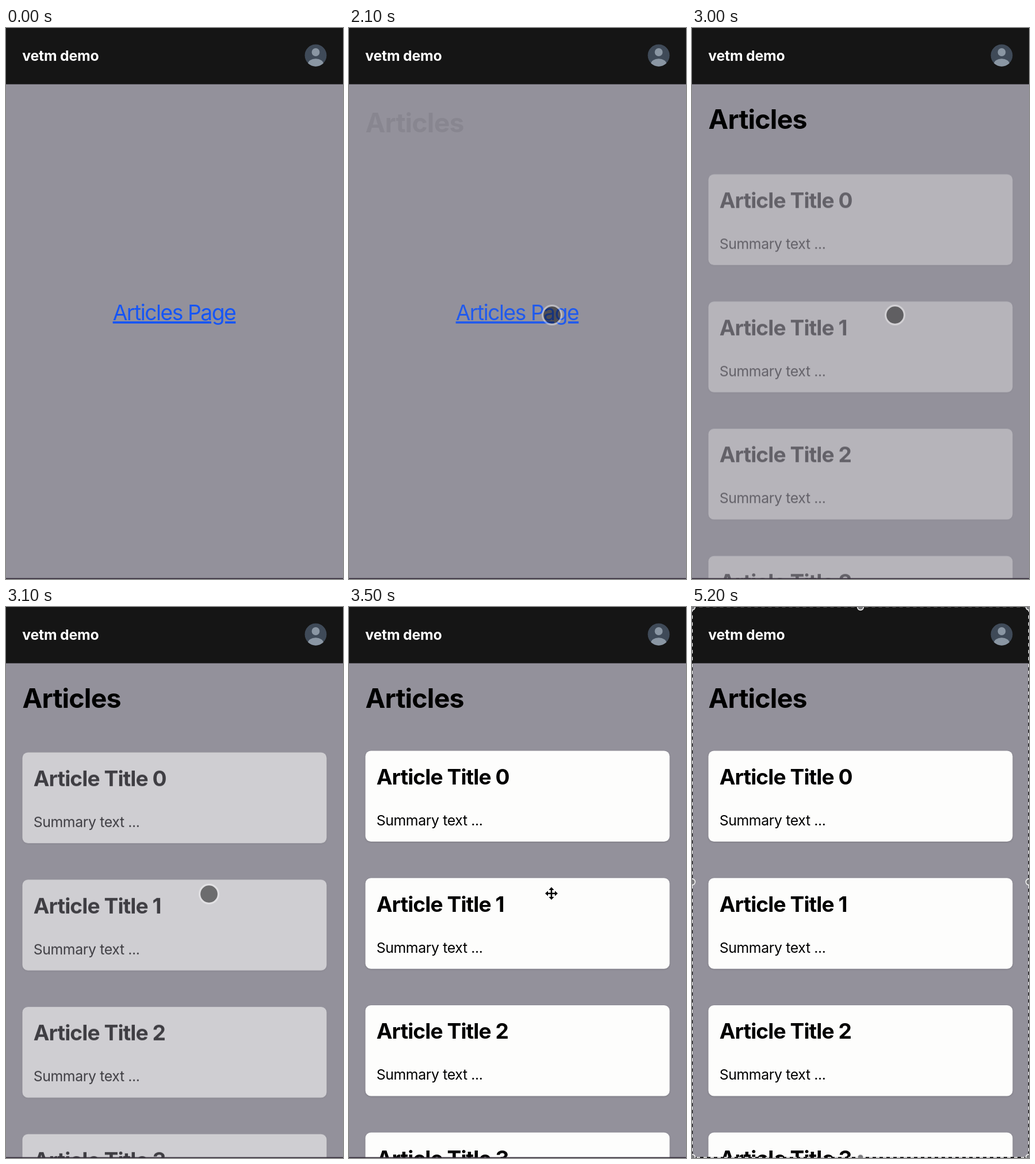
An HTML page for the animation above (5.3 s loop, 586x956 px).

```html
<!DOCTYPE html>
<html lang="en">
<head>
<meta charset="utf-8">
<title>Articles demo</title>
<style>
  html, body { margin: 0; width: 100%; height: 100%; overflow: hidden; background: #93919b; }
  svg { display: block; width: 586px; height: 956px; }
  text { font-family: Inter, "Liberation Sans", sans-serif; font-optical-sizing: none; }
  .brand { font-size: 24.8px; font-weight: 700; letter-spacing: -.008em; fill: #fff; }
  .link { font-size: 37.2px; font-weight: 440; letter-spacing: -.039em; fill: #1555f6; text-anchor: middle;
    text-decoration: underline; text-decoration-thickness: 3px; text-underline-offset: 3px; }
  .heading { font-size: 46.5px; font-weight: 700; letter-spacing: -.018em; }
  .title { font-size: 37.2px; font-weight: 700; letter-spacing: -.025em; }
  .summary { font-size: 24.8px; font-weight: 440; letter-spacing: -.015em; }
  .card { fill: #fdfdfc; filter: drop-shadow(0 1.6px 1.6px rgba(0, 0, 0, .16)); }
</style>
</head>
<body>
<svg viewBox="0 0 586 956">
  <defs><clipPath id="round"><circle cx="538.5" cy="47.5" r="19.2"/></clipPath></defs>
  <rect width="586" height="956" fill="#93919b"/>

  <g id="home"><text class="link" x="292.5" y="507">Articles Page</text></g>
  <g id="heading"><text class="heading" x="28.5" y="175.4">Articles</text></g>
  <g id="cards"></g>

  <rect width="586" height="97.6" fill="#151515"/>
  <text class="brand" x="28.3" y="56.6">vetm demo</text>
  <g clip-path="url(#round)">
    <circle cx="538.5" cy="47.5" r="19.2" fill="#3f4a58"/>
    <g fill="#8a96a3">
      <circle cx="538.5" cy="42" r="6.9"/>
      <ellipse cx="538.5" cy="63" rx="13.7" ry="9.8"/>
    </g>
  </g>
  <rect y="954.5" width="586" height="1.5" fill="#332b38"/>

  <g id="touch">
    <circle r="15" fill="rgba(13,13,13,.51)"/>
    <circle r="16.4" fill="none" stroke="rgba(255,255,255,.38)" stroke-width="3.2"/>
  </g>
  <path id="move" fill="#000" stroke="#fff" stroke-width="1.6" paint-order="stroke" stroke-linejoin="round"/>

  <g id="frame">
    <rect x=".5" y="-.5" width="585" height="955.5" fill="none" stroke="#111" stroke-width="1.6"/>
    <rect id="ants" x=".5" y="-.5" width="585" height="955.5" fill="none" stroke="#fff"
      stroke-width="1.4" stroke-dasharray="6 6"/>
    <g id="grips" fill="#7b7b7e" stroke="#f2f2f2" stroke-width="1.6"></g>
  </g>
</svg>
<script>
const LOOP = 5300, STEP = 100;
const SLIDE = 6.4;
const REST = [353, 498];
const $ = id => document.getElementById(id);

// Article list
$('cards').innerHTML = [0, 1, 2, 3].map(i => `
  <g transform="translate(28.5 ${249.4 + i * 220.75})">
    <rect class="card" width="529" height="157.6" rx="9.6"/>
    <text class="title" x="19.2" y="58.6">Article Title ${i}</text>
    <text class="summary" x="19.2" y="129.4">Summary text ...</text>
  </g>`).join('');

// Four-way arrow, one quarter turned four times
const arm = [[1.3, -1.3], [1.3, -6], [4.6, -6], [0, -11], [-4.6, -6], [-1.3, -6]];
const turn = ([x, y], n) => n ? turn([-y, x], n - 1) : [x, y];
$('move').setAttribute('d', 'M' + [0, 3, 2, 1]
  .map(n => arm.map(p => turn(p, n).join()).join('L')).join('L') + 'Z');

// Selection handles
for (const x of [0, 293, 586])
  for (const y of [0, 477, 955])
    if (x !== 293 || y !== 477)
      $('grips').innerHTML += `<circle cx="${x}" cy="${y}" r="5.4"/>`;

const span = (t, from, to) => Math.min(1, Math.max(0, (t - from) / (to - from)));
const easeOut = u => 1 - (1 - u) ** 2;
const easeInOut = u => u * u * (3 - 2 * u);

function fade(id, amount, slide = 0) {
  $(id).setAttribute('opacity', amount);
  $(id).setAttribute('transform', `translate(0 ${slide * (1 - amount)})`);
}

function place(id, [x, y], on) {
  $(id).setAttribute('transform', `translate(${x} ${y})`);
  $(id).setAttribute('visibility', on ? 'visible' : 'hidden');
}

const glide = (a, b, u) => a.map((v, i) => v + (b[i] - v) * easeInOut(u));

function draw(t) {
  fade('home', 1 - easeOut(span(t, 2080, 2500)));
  fade('heading', easeOut(span(t, 2080, 2680)), SLIDE);
  fade('cards', easeOut(span(t, 2890, 3500)), SLIDE);

  place('touch', glide([400, 985], REST, span(t, 300, 1000)), t >= 300 && t < 3200);
  place('move', glide([352, 497], [330, 985], span(t, 3900, 4600)), t >= 3200 && t < 4600);

  fade('frame', span(t, 3500, 3700));
  $('ants').setAttribute('stroke-dashoffset', -(t - 5200) / 50);
}

function tick() {
  const t = performance.now() % LOOP;
  draw(Math.floor(t / STEP) * STEP);
  requestAnimationFrame(tick);
}
tick();
</script>
</body>
</html>
```
